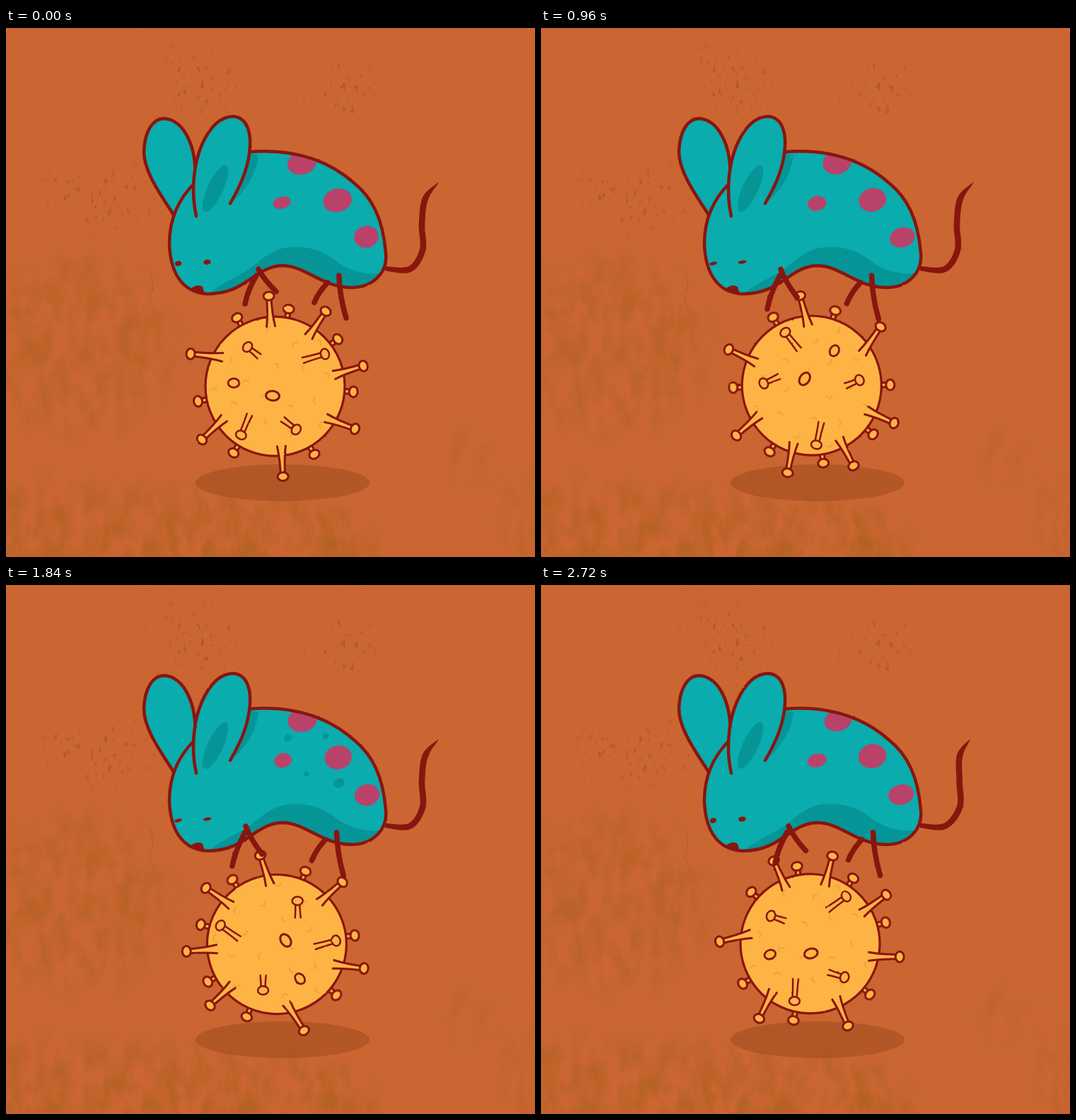
An HTML page that plays this animation: 748 by 748 pixels, repeating every 2800 ms.

```html
<!DOCTYPE html>
<html lang="en">
<head>
<meta charset="utf-8">
<title>Mouse on a rolling ball</title>
<style>
  html, body { margin: 0; width: 100%; height: 100%; overflow: hidden; background: #cb6632; }
  svg { display: block; width: 100vw; height: 100vh; }
  .line { stroke: #89150f; stroke-linecap: round; stroke-linejoin: round; fill: none; }
  .line.skin, .skin { fill: #0aacad; }
  .line.gold { fill: #fdb445; }
  .shade { fill: #069597; }
  .ink { fill: #89150f; }
</style>
</head>
<body>
<svg viewBox="0 0 748 748">
  <defs>
    <filter id="rough" x="0" y="0" width="748" height="748" filterUnits="userSpaceOnUse" color-interpolation-filters="sRGB">
      <feTurbulence type="fractalNoise" baseFrequency=".12" numOctaves="2" seed="4"/>
      <feDisplacementMap in="SourceGraphic" scale="1.6" xChannelSelector="R" yChannelSelector="G"/>
    </filter>
    <filter id="stain" x="0" y="0" width="748" height="748" filterUnits="userSpaceOnUse" color-interpolation-filters="sRGB">
      <feTurbulence type="fractalNoise" baseFrequency=".045 .025" numOctaves="6" seed="8"/>
      <feColorMatrix values="0 0 0 0 .66  0 0 0 0 .37  0 0 0 0 .12  2.4 0 0 0 -.8"/>
    </filter>
    <filter id="scratch" x="0" y="0" width="748" height="748" filterUnits="userSpaceOnUse" color-interpolation-filters="sRGB">
      <feTurbulence type="fractalNoise" baseFrequency=".16 .09" numOctaves="4" seed="21"/>
      <feColorMatrix values="0 0 0 0 .52  0 0 0 0 .3  0 0 0 0 .08  8 0 0 0 -5.2"/>
    </filter>
    <filter id="soft" x="-50%" y="-50%" width="200%" height="200%"><feGaussianBlur stdDeviation="24"/></filter>
    <mask id="patches" maskUnits="userSpaceOnUse" x="0" y="0" width="748" height="748">
      <g fill="#fff" filter="url(#soft)">
        <ellipse cx="100" cy="450" rx="140" ry="125" opacity=".5"/>
        <rect x="-40" y="650" width="440" height="140" opacity=".6"/>
        <path d="M400 670H470L540 760H440Z" opacity=".8"/>
        <ellipse cx="655" cy="605" rx="42" ry="28" opacity=".6"/>
        <ellipse cx="738" cy="690" rx="26" ry="60" opacity=".7"/>
      </g>
    </mask>
    <mask id="worn" maskUnits="userSpaceOnUse" x="0" y="0" width="748" height="748">
      <g fill="#fff" filter="url(#soft)">
        <ellipse cx="480" cy="85" rx="55" ry="45"/>
        <ellipse cx="265" cy="80" rx="60" ry="50"/>
        <ellipse cx="130" cy="240" rx="90" ry="40"/>
      </g>
    </mask>
    <path id="body" d="M268 218C240 245 231 275 231 305C232 340 245 374 285 376C340 376 350 338 390 336C425 336 445 367 490 367C520 366 540 345 537 318C533 270 518 240 492 219C450 182 400 171 345 175"/>
    <clipPath id="inBody"><use href="#body"/></clipPath>
  </defs>

  <rect width="748" height="748" fill="#cb6632"/>
  <g mask="url(#patches)"><rect width="748" height="748" filter="url(#stain)"/></g>
  <g mask="url(#worn)"><rect width="748" height="748" filter="url(#scratch)" opacity=".5"/></g>
  <path d="M205 345L208 368L203 384L211 405M208 368L198 377" stroke="#a35a24" fill="none" opacity=".6"/>
  <ellipse cx="391" cy="643" rx="123" ry="26" fill="#96461a" opacity=".45"/>

  <g filter="url(#rough)">
    <path id="tail" class="ink"/>
    <g id="ball"></g>

    <path class="line skin" stroke-width="4.5" d="M238 266C222 240 195 205 195 175C196 145 208 128 224 128C250 130 271 165 267 218"/>
    <use href="#body" class="skin"/>
    <g clip-path="url(#inBody)">
      <path class="shade" d="M285 378C300 362 325 354 345 340C368 322 380 311 403 310C428 308 446 314 466 329C482 342 510 352 540 345V380H430L390 338L345 365Z"/>
      <path class="shade" d="M343 176L357 180C353 206 342 228 317 248Z"/>
      <g id="dots" class="shade"></g>
      <g id="spots" fill="#b9426b"></g>
    </g>
    <use href="#body" class="line" stroke-width="4.5"/>
    <path class="line skin" stroke-width="4.5" d="M269 266C262 235 264 195 277 165C289 138 305 125 322 125C342 127 348 150 344 178C340 205 330 225 317 248"/>
    <path class="skin" d="M271 258L275 262L314 244L321 236L300 210Z"/>
    <ellipse class="shade" rx="11" ry="36" transform="translate(296 227) rotate(25)"/>
    <path class="ink" d="M262 368Q271 361 278 366L281 376Q269 377 262 368Z"/>
    <g id="eyes" class="ink"></g>
    <g id="legs" class="line" stroke-width="7.5"></g>
    <path id="drop" fill="#e98b2b" d="M6 -17C8 -4 8 12 0 18C-6 20 -9 14 -7 5C-5 -4 0 -13 6 -17Z"/>
  </g>
</svg>
<script>
const STEP = 80, COUNT = 35, TAU = 2 * Math.PI;
const HUB = { x: 380.5, y: 506.7, r: 98.5 };

// Direction in degrees and lean of the base.
const LONG = [[28, 4], [85, -1], [144, 4], [201, 8], [266, 0], [304, 0], [347, 2]];
const INNER = [[235, 7], [327, -10], [64, 13], [125, 7]];
const BACK = [4, 60, 122, 169, 241, 280, 323];

// Back to front; swing is the reach of one step.
const LEGS = [
  { hip: [453, 360], foot: [434, 389], swing: 2 },
  { hip: [469, 350], foot: [479, 411], swing: 2 },
  { hip: [345, 350], foot: [328, 394], swing: 10 },
  { hip: [347, 341], foot: [371, 377], swing: 11 }
];
const SPOTS = [[419, 191, 20, 16], [391, 248, 13, 9.5], [469, 243, 19.5, 16], [510, 296, 17.5, 15]];
const DOTS = [[399, 216, 6], [452, 214, 5], [425, 267, 4], [471, 280, 8]];

const el = id => document.getElementById(id);
const rand = n => { const v = Math.sin(n * 127.1 + 3.7) * 43758.5453; return v - Math.floor(v) - .5; };
const oval = (x, y, rx, ry, turn, attrs = '') =>
  `<ellipse rx="${rx}" ry="${ry}" transform="translate(${x} ${y}) rotate(${turn})" ${attrs}/>`;
const polar = (deg, r) =>
  [HUB.x + r * Math.cos(deg * TAU / 360), HUB.y + r * Math.sin(deg * TAU / 360)];

function spike(deg, lean, inner, outer, flare, width = 3) {
  const [bx, by] = polar(deg + lean, inner), [hx, hy] = polar(deg, outer);
  const turn = Math.atan2(hy - by, hx - bx) * 360 / TAU;
  const len = Math.hypot(hx - bx, hy - by);
  return `<g class="line gold" stroke-width="${width}" transform="translate(${bx} ${by}) rotate(${turn})">` +
    `<path d="M0 ${-flare}Q${len * .4} -3 ${len} -3V3Q${len * .4} 3 0 ${flare}"/>` +
    `<ellipse cx="${len}" rx="6" ry="7.5"/></g>`;
}

function buildBall() {
  let flecks = '';
  for (let i = 1; i <= 18; i++) {
    const [x, y] = polar(i * 137.5, 21 * Math.sqrt(i));
    flecks += `<path d="M-4 1Q0 -4 4 1" transform="translate(${x} ${y}) rotate(${rand(i) * 200})"/>`;
  }
  el('ball').innerHTML =
    BACK.map(deg => spike(deg, 0, 80, 111, 4)).join('') +
    `<circle class="line gold" stroke-width="3.2" cx="${HUB.x}" cy="${HUB.y}" r="${HUB.r}"/>` +
    `<g fill="none" stroke="#eba73c" stroke-width="2.4" stroke-linecap="round">${flecks}</g>` +
    LONG.map(([deg, lean]) => spike(deg, lean, 85, 128, 6)).join('') +
    INNER.map(([deg, lean], i) => spike(deg, lean, i % 2 ? 54 : 48, i % 2 ? 84 : 68, 4, 2.5)).join('') +
    oval(377, 520, 9.5, 6.8, 5, 'class="line" stroke-width="3"') +
    oval(322, 502, 8, 6.3, 0, 'class="line" stroke-width="2.8"');
}

// Feet ride forward on a spike, then lift and come back: seven steps a loop.
function leg({ hip, foot, swing }, frame) {
  const push = swing * Math.cos(TAU * 7 * frame / COUNT);
  const hx = hip[0] + push * .9, fx = foot[0] + push, fy = foot[1] - push * .4;
  return `<path d="M${hx} ${hip[1]}Q${(hx + fx) / 2 - 4} ${(hip[1] + fy) / 2} ${fx} ${fy}"/>`;
}

// Catmull-Rom spline through the points, thinning towards the tip.
function ribbon(pts) {
  const span = pts.length - 1, left = [], right = [];
  const at = i => pts[Math.max(0, Math.min(span, i))];
  const spline = t => {
    const i = Math.min(Math.floor(t), span - 1), s = t - i;
    return [0, 1].map(k => {
      const [a, b, c, d] = [-1, 0, 1, 2].map(o => at(i + o)[k]);
      return b + .5 * s * (c - a + s * (2 * a - 5 * b + 4 * c - d + s * (3 * (b - c) + d - a)));
    });
  };
  for (let j = 0; j <= 40; j++) {
    const t = j / 40 * span, [x, y] = spline(t);
    const [x0, y0] = spline(Math.max(0, t - .02)), [x1, y1] = spline(Math.min(span, t + .02));
    const w = Math.min(4.3, 3 + t * 1.5, (span - t) * 4.6) / Math.hypot(x1 - x0, y1 - y0);
    const nx = (y1 - y0) * w, ny = (x1 - x0) * w;
    left.push([x - nx, y + ny]);
    right.unshift([x + nx, y - ny]);
  }
  return 'M' + left.concat(right).join('L') + 'Z';
}

// The tail curls in and out on either side of the loop's seam.
function tail(frame) {
  const near = Math.min(frame, COUNT - frame, 12), s = Math.sin(Math.PI * near / 12);
  return ribbon([[536, 340], [571, 341], [589 + 12 * s, 314], [588 + 14 * s, 277],
    [593 - 3 * s, 241], [612 - 19 * s, 218]]);
}

function draw(frame) {
  const turn = TAU * frame / COUNT;
  el('ball').setAttribute('transform', `rotate(${frame * 10 - 1.8 * Math.sin(turn)} 382 506.8)`);
  el('tail').setAttribute('d', tail(frame));
  el('legs').innerHTML = LEGS.map(l => leg(l, frame)).join('');

  const open = 2.7 + .8 * Math.cos(turn), wide = 7 - open / 2;
  el('eyes').innerHTML = oval(243.5, 333, wide - .6, open, -14) + oval(284.5, 331, wide, open, -8);

  el('spots').innerHTML = SPOTS.map(([x, y, rx, ry], i) => {
    const j = k => rand(frame * 17 + i * 5 + k) * 2;
    return oval(x + j(0), y + j(1), rx + j(2), ry + j(3), -14);
  }).join('');
  const dotted = frame >= 22 && frame <= 25;
  el('dots').innerHTML = dotted ? DOTS.map(([x, y, r]) => oval(x, y, r, r * .8, -25)).join('') : '';

  const fall = frame - 5;
  el('drop').setAttribute('transform', `translate(${205 - fall * 4} ${302 + fall * 9})`);
  el('drop').style.display = fall >= -1 && fall <= 2 ? '' : 'none';
}

buildBall();
const start = performance.now();
let shown = -1;
function tick() {
  const frame = Math.floor((performance.now() - start) / STEP) % COUNT;
  if (frame !== shown) draw(shown = frame);
  requestAnimationFrame(tick);
}
tick();
</script>
</body>
</html>
```
